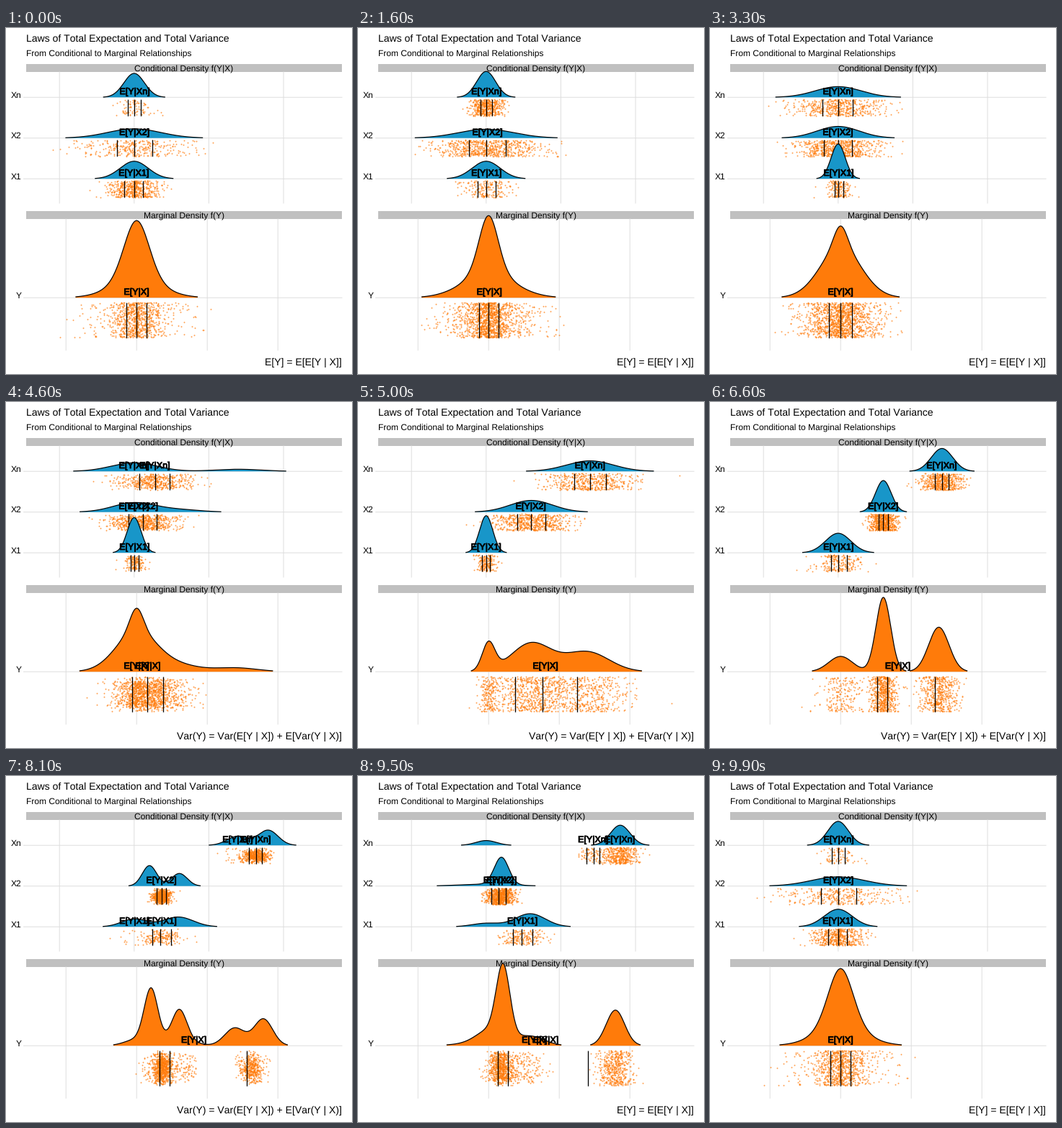
A matplotlib script for the animation above (10 s loop, 480 by 480 pixels).

```python
import numpy as np
import matplotlib.pyplot as plt
from matplotlib import patheffects
from matplotlib.animation import FuncAnimation
from matplotlib.patches import Rectangle

plt.rcParams.update({"font.family": "Liberation Sans",
                     "text.hinting": "none", "text.kerning_factor": 6})

SIZE = 480
BLUE, ORANGE, GRID, STRIP = "#1896c9", "#ff7b0a", "#dedede", "#c0c0c0"
STARTS = [12, 29, 46, 62, 79, 95]  # first tick of each transition
STEPS = 5
BANDWIDTH = 4.8
CAPTIONS = ["E[Y] = E[E[Y | X]]", "Var(Y) = Var(E[Y | X]) + E[Var(Y | X)]"]

# Means, spreads and sample sizes of X1, X2, Xn; 100 units per grid step.
EQUAL, SPREAD = (0, 0, 0), (0, 60.5, 139)
SCENES = [
    (EQUAL, (18.2, 35.4, 12.9), (500, 320, 80)),
    (EQUAL, (18.2, 37, 11.8), (190, 680, 480)),
    (EQUAL, (8.2, 27.9, 30.4), (160, 680, 490)),
    (SPREAD, (7.5, 27.9, 31), (190, 620, 480)),
    (SPREAD, (16.2, 9.3, 13.6), (210, 630, 520)),
    ((59, 20.5, 179.5), (19.6, 8.4, 12.2), (190, 730, 490)),
]

rng = np.random.default_rng(7)
fig = plt.figure(figsize=(SIZE / 72, SIZE / 72), dpi=72, facecolor="white")
ax = fig.add_axes([0, 0, 1, 1])
ax.set(xlim=(0, SIZE), ylim=(SIZE, 0))
ax.axis("off")


def mix(a, b, t):
    return a + (b - a) * t


def sample(mean, sd, n):
    """Normal draws, rescaled to the exact median and quartile range."""
    z = rng.normal(size=n)
    q1, q2, q3 = np.quantile(z, [0.25, 0.5, 0.75])
    return mean + sd * 1.349 * (z - q2) / (q3 - q1)


def density(groups, v):
    """Smoothed density of several normal groups, weighted by size."""
    total = sum(n for _, _, n in groups)
    h = 0
    for mean, sd, n in groups:
        width = np.hypot(sd, BANDWIDTH)
        h = h + n / total / width * np.exp(-0.5 * ((v - mean) / width) ** 2)
    return h


def rule(xs, ys):
    ax.plot(xs, ys, color=GRID, lw=1, zorder=1, snap=False)


class Row:
    """One ridge with its rain of points, quartile bars and label."""

    def __init__(self, name, label, base, depth, color, z,
                 origin, unit, gain, scenes, draws):
        band = (base + 2.7, base + 2.7 + depth) if depth < 30 else (
            base + 6.3, base + 6.3 + depth)
        v = np.linspace(-120, 260, 761)
        self.base, self.xs = base, origin + unit * v
        self.curves = [gain * density(groups, v) for groups in scenes]
        self.floor = 0.01 * max(c.max() for c in self.curves)
        xs = [origin + unit * d for d in draws]
        self.quartiles = [np.quantile(x, [0.25, 0.5, 0.75]) for x in xs]
        self.centres = [x.mean() for x in xs]
        self.points = [np.column_stack([x, rng.uniform(*band, len(x))])
                       for x in xs]

        self.fill, = ax.fill([0, 0], [0, 0], color=color, lw=0, zorder=z)
        self.edge, = ax.plot([], [], color="black", lw=1.2, zorder=z + 0.1)
        self.dots, = ax.plot([], [], "o", color=ORANGE, ms=1.9, mew=0,
                             alpha=0.75, zorder=z + 0.2)
        self.bars = [ax.plot([0, 0], band, color="black", lw=1.3,
                             solid_capstyle="butt", zorder=z + 0.3)[0]
                     for _ in range(3)]
        bold = [patheffects.withStroke(linewidth=0.9, foreground="black")]
        self.labels = [ax.text(0, base - 4.2, label, size=12.5, ha="center",
                               va="baseline", path_effects=bold, zorder=z + 0.4)
                       for _ in range(2)]
        rule([24.5, 466], [base, base])
        ax.text(21.5, base + 0.7, name, size=12, ha="right", va="baseline")

    def show(self, a, b, t):
        h = mix(self.curves[a], self.curves[b], t)
        seen = h >= self.floor
        top = self.base - np.where(seen, h, 0)
        outline_x = np.r_[self.xs, self.xs[::-1]]
        outline_y = np.r_[top, np.full(len(top), self.base)]
        self.fill.set_xy(np.column_stack([outline_x, outline_y]))
        self.edge.set_data(self.xs, np.where(seen, top, np.nan))

        # Unmatched points wait in place; new ones appear at the end.
        old, new = self.points[a], self.points[b]
        n = min(len(old), len(new))
        pts = new if t == 1 else np.vstack([mix(old[:n], new[:n], t), old[n:]])
        self.dots.set_data(pts[:, 0], pts[:, 1])

        for bar, x in zip(self.bars, mix(self.quartiles[a], self.quartiles[b], t)):
            bar.set_xdata([x, x])
        moving, waiting = self.labels
        moving.set_x(mix(self.centres[a], self.centres[b], t))
        waiting.set_x(self.centres[a])
        waiting.set_visible(t < 1 and len(old) > len(new))


def panel(title, top, bottom, origin, unit):
    strip = Rectangle((28, top), 438, 11, color=STRIP, lw=0, zorder=0)
    ax.add_patch(strip)
    text = ax.text(247, top + 10.9, title, size=12, ha="center", va="baseline")
    text.set_clip_path(strip)
    for k in range(-1, 3):
        x = origin + 100 * unit * k
        rule([x, x], [top + 11, bottom])


TOP = dict(origin=177.8, unit=1.036)
BOTTOM = dict(origin=181.2, unit=0.98)

panel("Conditional Density f(Y|X)", 50, 243, **TOP)
panel("Marginal Density f(Y)", 254, 447, **BOTTOM)
ax.text(28, 19, "Laws of Total Expectation and Total Variance", size=14)
ax.text(28, 39.2, "From Conditional to Marginal Relationships", size=12)
caption = ax.text(466, 468, "", size=14, ha="right")

groups = [list(zip(*scene)) for scene in SCENES]
draws = [[sample(*g) for g in scene] for scene in groups]

rows = [
    Row(name, f"E[Y|{name}]", 209.2 - 56.5 * j, 23, BLUE, 5 - j, gain=458,
        scenes=[[g[j]] for g in groups], draws=[d[j] for d in draws], **TOP)
    for j, name in enumerate(["X1", "X2", "Xn"])
]
rows.append(Row("Y", "E[Y|X]", 374.2, 49, ORANGE, 6, gain=2330, scenes=groups,
                draws=[np.concatenate(d) for d in draws], **BOTTOM))


def update(i):
    k = sum(s <= i for s in STARTS)
    if k:
        a, b = k - 1, k % len(STARTS)
        t = min((i - STARTS[a] + 1) / STEPS, 1)
    else:
        a, b, t = 0, 0, 1
    for row in rows:
        row.show(a, b, t)
    caption.set_text(CAPTIONS[b // 3])
    return []


anim = FuncAnimation(fig, update, frames=100, interval=100,
                     repeat=True, repeat_delay=0, blit=False)
plt.show()
```
